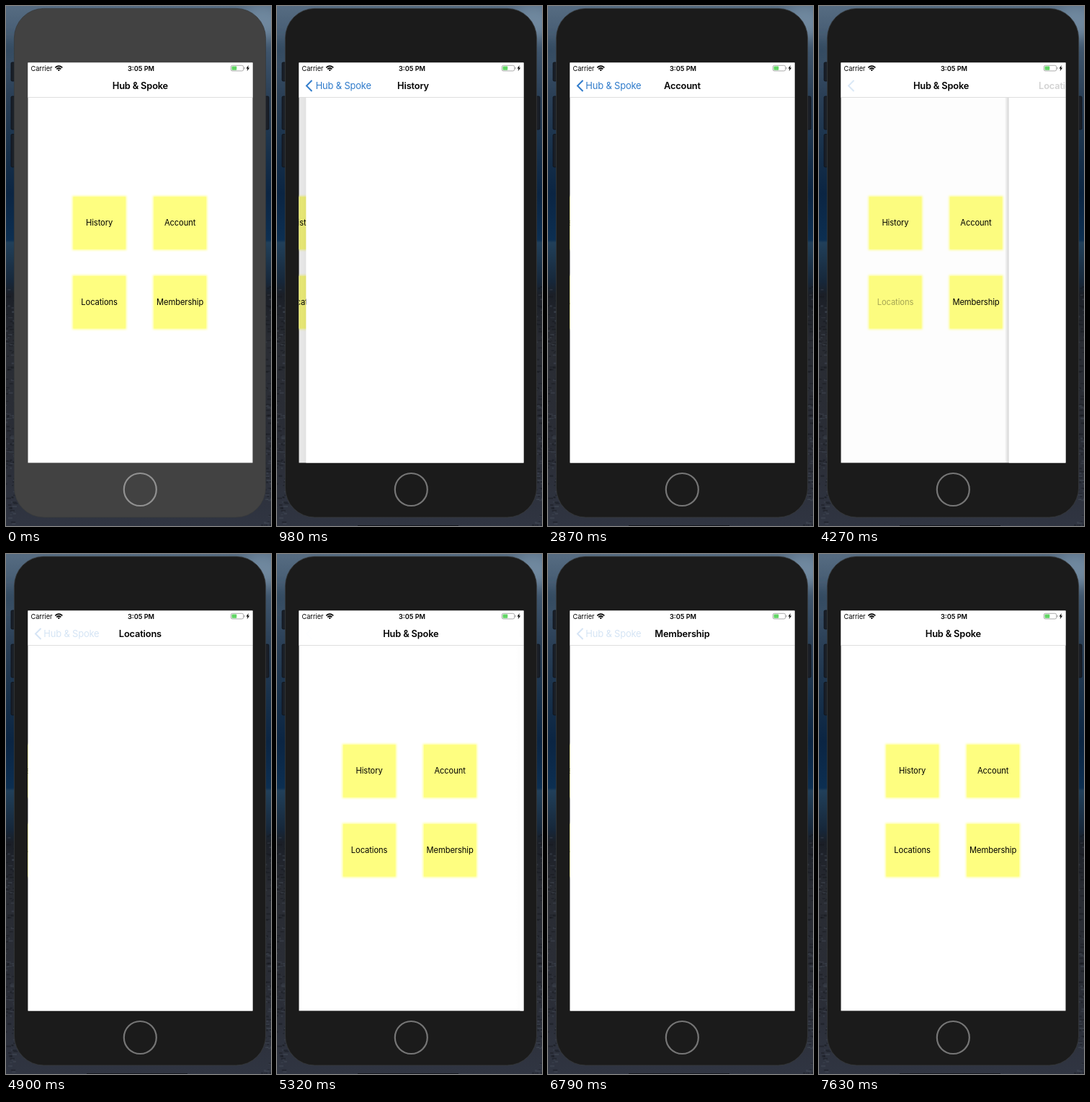
An HTML page for the animation above (7.7 s loop, 368 by 720 pixels).

```html
<!DOCTYPE html>
<html lang="en">
<head>
<meta charset="utf-8">
<title>Hub &amp; Spoke</title>
<style>
  html, body { margin: 0; width: 100%; height: 100%; overflow: hidden; background: #1b2430; }
  svg { display: block; width: 100vw; height: 100vh; }
  text { font-family: Inter, Roboto, sans-serif; text-anchor: middle; }
  .title { font-size: 12.8px; font-weight: 600; letter-spacing: -.15px; }
  .back { font-size: 12.9px; letter-spacing: -.15px; fill: #2f7bcb; }
  .tile { font-size: 11.2px; letter-spacing: -.1px; }
  .status { font-size: 9.2px; }
</style>
</head>
<body>
<svg viewBox="0 0 368 720">
  <defs>
    <linearGradient id="sea" x2="0" y2="1">
      <stop offset="0" stop-color="#566c82"/>
      <stop offset=".08" stop-color="#40566d"/>
      <stop offset=".17" stop-color="#2b4057"/>
      <stop offset=".28" stop-color="#17304a"/>
      <stop offset=".36" stop-color="#0b2543"/>
      <stop offset=".45" stop-color="#0c2f52"/>
      <stop offset=".455" stop-color="#21405a"/>
      <stop offset=".53" stop-color="#16273a"/>
      <stop offset=".555" stop-color="#1b1f27"/>
      <stop offset=".65" stop-color="#292c33"/>
      <stop offset=".85" stop-color="#2a2d36"/>
      <stop offset="1" stop-color="#303542"/>
    </linearGradient>
    <linearGradient id="edge">
      <stop offset="0" stop-color="#000" stop-opacity="0"/>
      <stop offset="1" stop-color="#000" stop-opacity=".22"/>
    </linearGradient>
    <filter id="soft" x="-10%" y="-10%" width="120%" height="120%">
      <feGaussianBlur stdDeviation="1.6"/>
    </filter>
    <filter id="haze" x="-50%" y="-50%" width="200%" height="200%">
      <feGaussianBlur stdDeviation="9"/>
    </filter>
    <clipPath id="screen"><rect x="30.500" y="78.500" width="312" height="554"/></clipPath>
  </defs>

  <rect width="368" height="720" fill="url(#sea)"/>
  <g filter="url(#haze)">
    <ellipse cx="356" cy="22" rx="30" ry="24" fill="#70889f"/>
    <ellipse cx="2" cy="62" rx="22" ry="12" fill="#33495f"/>
  </g>
  <g id="rocks"></g>
  <rect id="strip" x="112" y="719" width="140" height="1" fill="#14171d"/>
  <g fill="#1a1f27" stroke="#0d1117" stroke-width=".8">
    <rect x="7" y="78" width="6" height="26" rx="1.5"/>
    <rect x="7" y="125" width="6" height="46" rx="1.5"/>
    <rect x="7" y="177.500" width="6" height="45.500" rx="1.5"/>
    <rect x="359" y="125" width="6" height="46" rx="1.5"/>
  </g>
  <rect id="body" x="11.400" y="3.400" width="349.200" height="704.600" rx="41" stroke="#383a3c" stroke-width=".8"/>
  <circle id="home" cx="186.300" cy="669.500" r="22.500" fill="none" stroke-width="2.200"/>

  <g clip-path="url(#screen)">
    <rect x="30" y="78" width="313" height="555" fill="#fff"/>
    <g id="hub"></g>
    <rect id="dim" x="30" y="127" width="313" height="506"/>
    <g id="page">
      <rect id="shadow" x="-6" y="127" width="6" height="506" fill="url(#edge)"/>
      <rect y="127" width="313" height="506" fill="#fff"/>
    </g>
    <rect x="30" y="78" width="313" height="48" fill="#fff"/>
    <rect x="30" y="126" width="313" height="1" fill="#dedede"/>
    <text id="hubTitle" class="title" y="114.800">Hub &amp; Spoke</text>
    <text id="pageTitle" class="title" y="114.800"></text>
    <text id="backLabel" class="back" y="114.800">Hub &amp; Spoke</text>
    <path id="chevron" d="M48.500 103l-7.500 7.500 7.500 7.500" fill="none" stroke="#2f7bcb" stroke-width="2"/>

    <text class="status" x="49.500" y="89.700">Carrier</text>
    <path d="M68.300 85.300q5-4.300 10 0M70.200 87.300q3.100-2.600 6.200 0" fill="none" stroke="#000" stroke-width="1.700"/>
    <path d="M71.700 88.400q1.600-1.200 3.200 0l-1.600 1.800z"/>
    <text class="status" x="187.500" y="89.700" font-weight="600">3:05 PM</text>
    <rect x="312.300" y="82.300" width="17.400" height="7.600" rx="2" fill="#fff" stroke="#999" stroke-width=".8"/>
    <rect x="313.500" y="83.500" width="6.800" height="5.200" rx=".8" fill="#62d565"/>
    <rect x="330.400" y="84.700" width="1" height="2.800" rx=".5" fill="#999"/>
    <path d="M336.800 82l-3.300 4.600h2l-.8 3.600 3.400-4.800h-2z"/>
  </g>
</svg>
<script>
const LOOP = 7700, STEP = 70, WIDTH = 312, LEFT = 30.5, CENTER = 186.4;
const NAMES = ["History", "Account", "Locations", "Membership"];

// Each visit: tile press, push start, back press, pop start.
const VISITS = [
  [490, 690, 1610, 1760],
  [2150, 2330, 3150, 3450],
  [4060, 4217, 4830, 4986],
  [5750, 5900, 6790, 7000]
];

const $ = id => document.getElementById(id);
const clamp = v => Math.min(1, Math.max(0, v));
const mix = (a, b, k) => a + (b - a) * k;
const fade = (el, v) => el.setAttribute("opacity", clamp(v).toFixed(3));

$("hub").innerHTML = NAMES.map((name, i) => {
  const x = 92.2 + (i % 2) * 112, y = 263 + (i >> 1) * 109.7;
  return `<rect x="${x}" y="${y}" width="75" height="75" fill="#ffff8c" filter="url(#soft)"/>
    <rect x="${x + 1.3}" y="${y + 1.3}" width="72.4" height="72.4" fill="#fefe80"/>
    <text class="tile" x="${x + 37.4}" y="${y + 41.2}">${name}</text>`;
}).join("");
const labels = [...$("hub").querySelectorAll("text")];

// Seeded specks give the shore its grain.
let seed = 7;
const random = () => (seed = seed * 16807 % 2147483647) / 2147483647;
$("rocks").innerHTML = Array.from({ length: 260 }, (_, i) => {
  const x = (i % 2 ? 354 : -3) + random() * 14, y = 388 + random() * 332;
  return `<rect x="${x}" y="${y}" width="${2 + random() * 5}" height="${1 + random() * 1.5}"
    fill="${random() < .6 ? "#12151b" : "#4a505c"}" opacity=".4"/>`;
}).join("");

// Critically damped spring from 0 to 1.
function spring(ms, omega) {
  const u = Math.max(0, ms) / 1000 * omega;
  const v = 1 - (1 + u) * Math.exp(-u);
  return v > .998 ? 1 : v;
}

// Highlight drops at once and recovers after release.
const touch = (t, press, release) =>
  t < press ? 1 : mix(.2, 1, clamp((t - release) / 300));

function draw(t) {
  const wake = clamp(t / 210);
  const gray = Math.round(mix(66, 27, wake));
  const ring = Math.round(mix(145, 118, wake));
  $("body").setAttribute("fill", `rgb(${gray},${gray},${gray})`);
  $("home").setAttribute("stroke", `rgb(${ring},${ring},${ring})`);
  fade($("strip"), wake);

  const current = Math.max(0, VISITS.findLastIndex(v => t >= v[1]));
  const [, push, backPress, pop] = VISITS[current];
  const progress = (omega, delay) =>
    spring(t - push - delay, omega) - spring(t - pop - delay, omega);
  const open = clamp(progress(18.26, 0));
  const nav = clamp(progress(23, 20));

  $("hub").setAttribute("transform", `translate(${-.3 * WIDTH * open})`);
  fade($("dim"), .1 * open * open);
  $("page").setAttribute("transform", `translate(${LEFT + WIDTH * (1 - open)})`);
  fade($("page"), open > 0 ? 1 : 0);
  fade($("shadow"), 4 * open * (1 - open));
  labels.forEach((el, i) => fade(el, touch(t, VISITS[i][0], VISITS[i][1])));

  const backX = mix(CENTER, 90.9, nav);
  const pressed = touch(t, backPress, pop);
  $("hubTitle").setAttribute("x", backX);
  fade($("hubTitle"), 1.35 - 2 * nav);
  $("backLabel").setAttribute("x", backX);
  fade($("backLabel"), clamp(2 * nav - .6) * pressed);
  fade($("chevron"), nav * pressed);
  $("pageTitle").textContent = NAMES[current];
  $("pageTitle").setAttribute("x", CENTER + 180 * (1 - nav));
  fade($("pageTitle"), nav);
}

const start = performance.now();
function tick() {
  const t = Math.max(0, performance.now() - start) % LOOP;
  draw(Math.floor(t / STEP) * STEP);
  requestAnimationFrame(tick);
}
tick();
</script>
</body>
</html>
```
